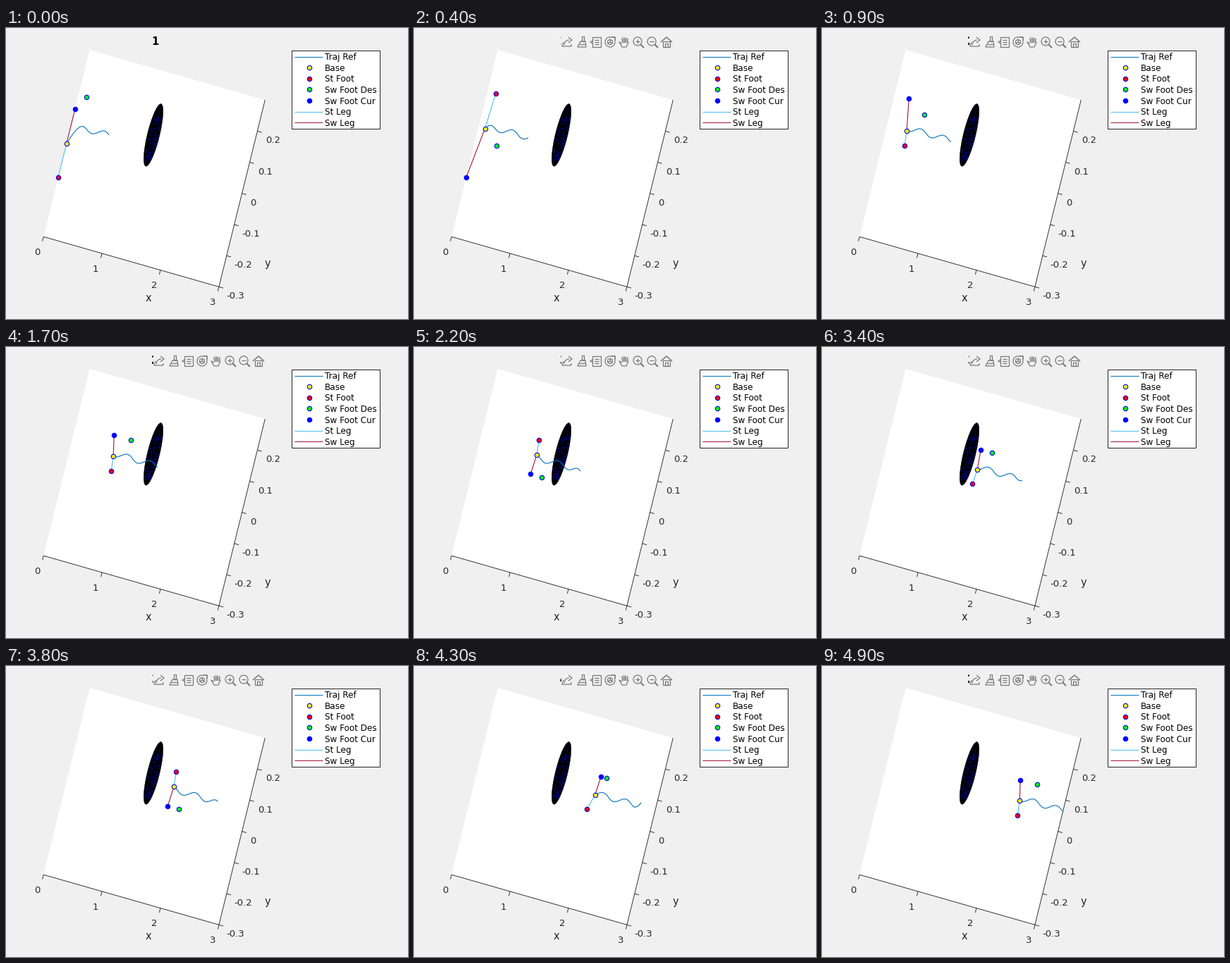
Write a matplotlib script that moves like this. It is 570 by 413 pixels and loops after 5000 ms.

```python
import numpy as np
import matplotlib.pyplot as plt
from matplotlib.animation import FuncAnimation
from matplotlib.patches import Circle, Polygon, Rectangle

W, H, DPI = 570, 413, 100
FRAMES, INTERVAL = 50, 100
PT = 72 / DPI
BACK, INK, GREY = "#f0f0f0", "#262626", "#767676"
TRAJ, ST_LEG, SW_LEG = "#0072bd", "#4dbeee", "#a2142f"
ORIGIN = np.array([85.9, 163.6])
X_UNIT = np.array([82.9, 23.7])
Y_UNIT = np.array([109.0, -442.0])
DISC, DISC_R = np.array([1.355, 0.099]), 0.1
STEP = 4  # frames per footstep

plt.rcParams["font.family"] = "DejaVu Sans"
fig = plt.figure(figsize=(W / DPI, H / DPI), dpi=DPI, facecolor=BACK)
ax = fig.add_axes([0, 0, 1, 1])
ax.set_xlim(0, W)
ax.set_ylim(H, 0)
ax.axis("off")


def to_px(x, y):
    """Ground coordinates to stage pixels."""
    return ORIGIN + np.multiply.outer(x, X_UNIT) + np.multiply.outer(y, Y_UNIT)


def line(points, color, width=1.0, z=3):
    xs, ys = np.asarray(points, float).T
    return ax.plot(xs, ys, color=color, lw=width * PT, zorder=z,
                   solid_capstyle="butt", solid_joinstyle="round")[0]


def dot(face, x=0, y=0, z=6):
    return ax.plot([x], [y], "o", ms=6.4 * PT, mfc=face, mec="#0000ff",
                   mew=1.1 * PT, zorder=z)[0]


def label(x, baseline, text, size, ha="left", color=INK, **kw):
    return ax.text(x, baseline, text, fontsize=size * PT, ha=ha,
                   va="baseline", color=color, **kw)


def draw_axes():
    corners = to_px(np.array([0, 3, 3, 0]), np.array([0.3, 0.3, -0.3, -0.3]))
    area = ax.add_patch(Polygon(corners, fc="white", ec="none", zorder=1))
    line(corners[[3, 2, 1]], INK, 0.9, 2)
    for i in range(4):
        p = to_px(i, -0.3)
        line([p, p + (-1.6, 6.4)], INK, 0.9, 2)
        label(44.5 + 82.8 * i, 322 + 23.6 * i, str(i), 13.3, "center")
    for i in range(6):
        p = to_px(3, -0.3 + 0.1 * i)
        line([p, p + (6.2, 1.8)], INK, 0.9, 2)
        text = f"{(i - 3) / 10:g}"
        label(312.6 + 11.1 * i, 384.4 - 44.2 * i, text, 13.3)
    label(201.5, 388.4, "x", 14.6, "center")
    label(370.5, 339, "y", 14.6, "center")
    return area


def draw_obstacle():
    """Dense black mesh with blue faces showing through."""
    def on_disc(radius, angle):
        return to_px(DISC[0] + radius * np.cos(angle), DISC[1] + radius * np.sin(angle))
    rim = on_disc(DISC_R, np.linspace(0, 2 * np.pi, 90))
    ax.add_patch(Polygon(rim, fc="black", ec="black", lw=0.5 * PT, zorder=2))
    rng = np.random.default_rng(4)
    specks = on_disc(0.088 * np.sqrt(rng.random(130)), rng.random(130) * 2 * np.pi)
    ax.scatter(*specks.T, s=0.9, c="#0000c0", lw=0, zorder=2.1)


def draw_legend():
    ax.add_patch(Rectangle((404.5, 31.5), 125, 111, fc="white", ec=INK,
                           lw=PT, zorder=2))
    entries = [("Traj Ref", TRAJ, line), ("Base", "yellow", dot),
               ("St Foot", "red", dot), ("Sw Foot Des", "#00ff00", dot),
               ("Sw Foot Cur", "blue", dot), ("St Leg", ST_LEG, line),
               ("Sw Leg", SW_LEG, line)]
    for row, (text, color, kind) in enumerate(entries):
        y = 40.5 + 15.6 * row
        if kind is line:
            line([(409, y), (449, y)], color)
        else:
            dot(color, 429.5, y)
        label(451.8, y + 4.7, text, 12, color="black", zorder=4)


def draw_toolbar():
    """Plain tool icons, each drawn around its own centre."""
    parts = [ax.add_patch(Rectangle((208.5, 9), 158, 22, fc=BACK, ec="none", zorder=8))]

    def stroke(cx, points, width=1.2):
        parts.append(line(np.array(points, float) + (cx, 20), GREY, width, 9))

    def box(cx, x, y, w, h):
        parts.append(ax.add_patch(Rectangle((cx + x, 20 + y), w, h, fc="none",
                                            ec=GREY, lw=1.2 * PT, zorder=9)))

    def arc(r, start, stop, count=30):
        a = np.radians(np.linspace(start, stop, count))
        return r * np.c_[np.cos(a), np.sin(a)]

    stroke(217, [(-5, 0), (-7, 6), (6, 6), (6, 3)])                # export
    stroke(217, arc(7, 180, 270) + (3, 4))
    stroke(217, [(2, -7), (7, -3), (2, 1)])
    box(238, 0, -8, 3, 7)                                          # brush
    stroke(238, [(-2, -1), (5, -1), (6, 7), (-6, 7), (-2, -1)])
    stroke(238, [(-4, 3), (5, 3)])
    box(258, -5, -7, 12, 14)                                       # data tip
    for y in (-3, 0, 3):
        stroke(258, [(-2, y), (4, y)])
    stroke(258, [(-5, -2), (-8, 0), (-5, 2)])
    stroke(278, arc(7, -15, 290))                                  # rotate
    stroke(278, [(2, -7), (7, -7), (7, -2)], 1.6)
    stroke(278, arc(3.8, 30, 390, 7))
    for spoke in arc(3.8, -30, 210, 3) * (1, -1):
        stroke(278, [(0, 0), spoke])
    for i in range(4):                                             # pan
        stroke(298, [(2.6 * i - 3, abs(i - 1.3) - 7), (2.2 * i - 2, 1)], 1.5)
    stroke(298, [(-3, 2), (-7, 0), (-3, 7), (3, 7), (6, 0)])
    for cx in (318, 338):                                          # zoom
        parts.append(ax.add_patch(Circle((cx - 1, 19), 6, fc="none", ec=GREY,
                                         lw=1.2 * PT, zorder=9)))
        stroke(cx, [(3.5, 3.5), (8, 8)], 2)
        stroke(cx, [(-4, -1), (2, -1)])
    stroke(318, [(-1, -4), (-1, 2)])
    stroke(358, [(-8, 0), (0, -7), (8, 0)], 1.5)                   # home
    box(358, -5, -1, 10, 8)
    box(358, -2, 2, 4, 5)
    return parts


plot_area = draw_axes()
draw_obstacle()
draw_legend()
title = label(211, 24, "1", 14.6, "center", "black", weight="bold", zorder=7)
toolbar = draw_toolbar()

traj = line([(0, 0)], TRAJ, 1.1)
traj.set_clip_path(plot_area)
st_leg = line([(0, 0)], ST_LEG, 1.1, 4)
sw_leg = line([(0, 0)], SW_LEG, 1.1, 4)
base_dot, st_dot = dot("yellow"), dot("red")
des_dot, cur_dot = dot("#00ff00"), dot("blue", z=7)


def base_path(t, mean):
    """Steady walk with lateral sway, eased in from rest at the origin."""
    def sway(s):
        return mean - 0.009 * np.cos(np.pi * (s - 9.6) / STEP)
    x = 0.0483 * t - 0.0997 * (1 - np.exp(-t / 2.06))
    y = sway(t) - sway(0) * (1 + t / 1.4) * np.exp(-t / 1.4)
    return x, y


def foothold(step):
    """Even steps are right feet, odd steps left; the walk starts wide."""
    if step < 2:
        return np.array([(0, 0.11), (0, -0.11), (0.1416, 0.1675)][step + 1])
    return np.array([0.193 * step - 0.024, 0.0674 - 0.0549 * (-1) ** step])


def exposed(foot):
    return np.hypot(*(foot - DISC)) >= DISC_R


def update(n):
    step, phase = divmod(n, STEP)
    stance, start = foothold(step), foothold(step - 1)
    # The first target drifts outwards until it settles
    goal = foothold(step + 1) - np.array([0.0046, 0.0125]) * max(0, 1 - n / 3)
    current = start + (goal - start) * phase / STEP

    # Preview of the next strides; its end bends to the swing side,
    # more strongly while passing the obstacle
    end = n + 15.4 + 0.18 * phase
    t = np.linspace(n, end, 120)
    x, y = base_path(t, 0.060 + 0.007 * min(n / 8, 1))
    bend = 0.0018 * phase ** 2 * (1 + 1.3 * np.exp(-((n - 25) / 4) ** 2))
    y += (-1) ** step * bend * np.clip((t - end + 2.5) / 2.5, 0, 1) ** 2
    path = to_px(x, y)
    traj.set_data(*path.T)

    base = path[0]
    base_dot.set_data(*base[:, None])
    for leg, foot in ((st_leg, stance), (sw_leg, current)):
        leg.set_data(*np.array([base, to_px(*foot)]).T)
    for marker, foot in ((st_dot, stance), (des_dot, goal), (cur_dot, current)):
        marker.set_data(*to_px(*foot)[:, None])
        lifted = marker is cur_dot and phase > 0
        marker.set_visible(bool(lifted or exposed(foot)))

    title.set_text(str(phase + 1))
    for part in toolbar:
        part.set_visible(n > 0)
    return []


anim = FuncAnimation(fig, update, frames=FRAMES, interval=INTERVAL,
                     repeat=True, blit=False)
plt.show()
```
